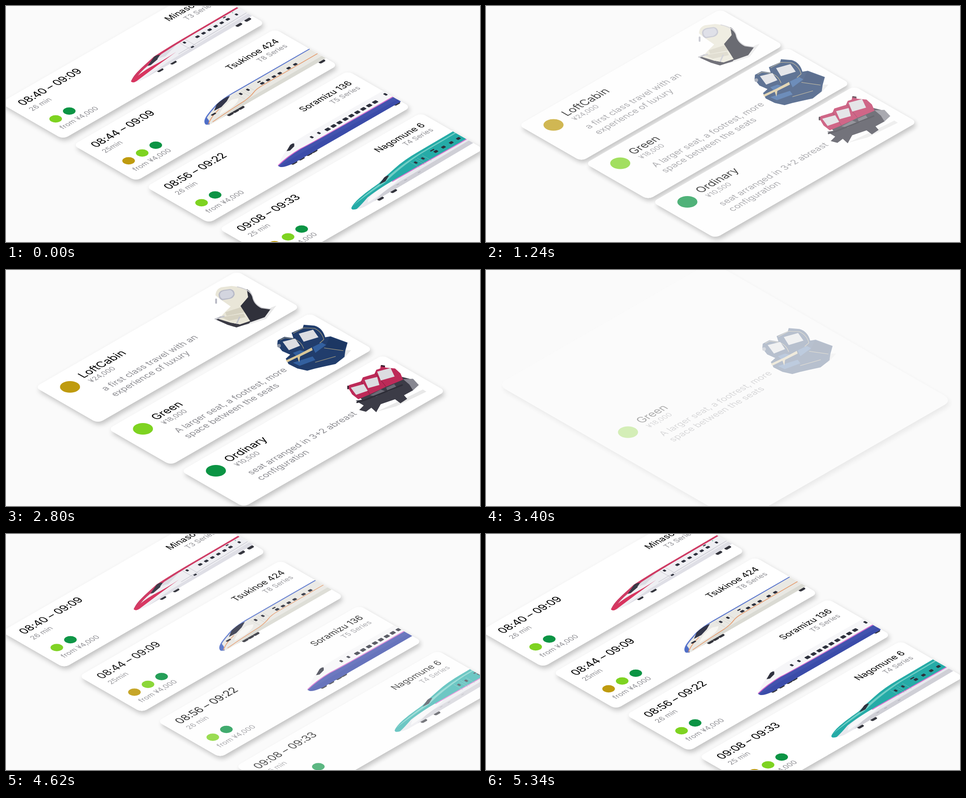
Recreate the animation shown at these times as an HTML page. Size 1058 px wide and 529 px high, loop 5.58 s.

```html
<!DOCTYPE html>
<html lang="en">
<head>
<meta charset="utf-8">
<title>Train and seat cards</title>
<style>
  html, body { margin: 0; width: 100%; height: 100%; overflow: hidden; background: #fafafa; }
  #stage { position: absolute; left: 0; top: 0; width: 1058px; height: 529px; overflow: hidden; }
  #plane {
    position: absolute; left: 0; top: 0; width: 0; height: 0;
    transform-origin: 0 0; transform: matrix(.866025, -.5, .866025, .5, 0, 0);
  }
  .card { position: absolute; box-shadow: -4px 8px 12px rgba(0, 0, 0, .23); }
  .face { position: absolute; inset: 0; overflow: hidden; background: #fff; border-radius: inherit; }
  svg { position: absolute; left: 50%; top: 50%; margin: -81px 0 0 -260px; }
  text {
    font-family: Inter, Roboto, sans-serif; font-size: 16px; fill: #8e8e93;
    font-optical-sizing: none;
  }
  .time { font-size: 24px; letter-spacing: -.5px; fill: #000; }
  .title { font-size: 24.5px; fill: #000; }
  .name { font-size: 20px; fill: #000; }
  .note { font-size: 20px; }
  .end { text-anchor: end; }
</style>
</head>
<body>
<div id="stage"><div id="plane"></div></div>
<script>
const LOOP = 5580, W = 520, H = 162, LEFT = -225.5, STEP = 188;
const TRAIN_TOP = 210, SEAT_TOP = 300;
const PANEL = { x: -242, y: 272, w: 551, h: 621, r: 20 };
const GOLD = '#bf9b0f', LIME = '#7ed321', GREEN = '#0b9444', DARK = '#2d303c';

const path = (d, fill, extra = '') => `<path d="${d}" fill="${fill}" ${extra}/>`;
const line = (d, color, width) =>
  path(d, 'none', `stroke="${color}" stroke-width="${width}" stroke-linejoin="round" stroke-linecap="round"`);
const dot = (x, y, r, fill) => `<circle cx="${x}" cy="${y}" r="${r}" fill="${fill}"/>`;
const text = (x, y, cls, s) => `<text x="${x}" y="${y}" class="${cls}">${s}</text>`;
const box = (x, y, w, h, fill = DARK) =>
  `<rect x="${x - w / 2}" y="${y - h / 2}" width="${w}" height="${h}" rx="1.4" fill="${fill}"/>`;
const boxes = (xs, y, w, h, fill) => xs.map(x => box(x, y, w, h, fill)).join('');
const wheels = (xs, y) => xs.map(x =>
  `<rect x="${x - 7}" y="${y - 4}" width="14" height="8" rx="3.5" fill="#34353d"/>`).join('');
const row = (start, step, n) => Array.from({ length: n }, (_, i) => start + step * i);

// Side views, in card coordinates
const redTrain =
  wheels([280, 314, 483, 506], 132) +
  path('M218,119 C232,111 246,107 262,103 L302,94 Q350,91 400,91 L522,90 V129 L300,131 H238 Q214,129 218,119Z', '#efeff3') +
  path('M310,124 L522,119 V129 L300,131 H240Z', '#dfdfe6') +
  path('M217,120 C232,111 246,107 262,103 L302,94 Q350,91 400,91 L522,90 V94 L400,95 Q340,96 306,100 L262,109 Q236,115 220,126Z', '#cf3a63') +
  path('M217,120 Q250,113 275,113 Q310,115 342,112 Q286,118 230,126 Q214,129 217,120Z', '#d8355f') +
  path('M273,107 L301,95 Q310,93 314,98 L300,105 L279,109Z', '#3a3a47') +
  path('M302,103 L318,98 L360,96 L318,108Z', '#dcdce3') +
  line('M340,120 L522,115', '#c3c3cc', 1.3) +
  line('M366,97 V124 M381,97 V123', '#c3c3cc', .8) +
  boxes(row(403, 15.6, 6), 105.6, 8, 6) + box(373, 102, 5, 6) + box(373.5, 122, 7, 4) +
  box(481, 97, 7, 2.6) + box(503, 106, 5, 6) + box(502, 97, 2, 2, '#2aa37a');

const creamTrain =
  wheels([272, 286, 300, 508], 133) +
  path('M217,124 C222,113 240,106 262,99 Q285,90 320,89 L522,89 V131 H240 Q214,132 217,124Z', '#e9e8e3') +
  path('M250,131 Q310,121 345,122 L522,121 V131Z', '#dadad3') +
  line('M218,124 C222,113 240,106 262,99 Q285,90 320,89.5 L522,89.5', '#5a76cd', 2.4) +
  path('M217,126 Q219,116 234,110 L230,120 L222,130Z', '#4f6fc8') +
  path('M258,105 L276,94 Q300,88 312,92 L296,100 L276,106Z', '#33364a') +
  path('M256,121 Q278,105 306,103 L318,108 Q310,118 282,121Z', '#f8f7f3') +
  line('M222,127 Q240,115 268,108 M232,128 Q280,124 320,122 Q338,120 350,115 T382,110.5 L522,110', '#e59a6c', 1.6) +
  box(250, 112, 11, 4) +
  line('M324,96 V119 M337,96 V118 M343,96 V116 M356,96 V113', '#cfcec8', .7) +
  boxes([330.5, 349], 101.5, 5, 7) + boxes([382, 397, 412, 427, 450, 467], 105.5, 8, 6) +
  box(381, 98, 8, 3);

const blueTrain =
  wheels([245, 264, 284, 297, 510], 136) +
  path('M218,123 C232,113 246,106 262,99 Q285,89 325,89 L522,90 V118 L300,114Z', '#f6f6f8') +
  path('M217,123 Q250,115 285,114 Q320,117 522,117 V137 H245 Q216,135 217,123Z', '#4253ae') +
  path('M217,126 Q250,124 285,124 L522,128 V137 H245 Q218,135 217,126Z', '#3b4ca9') +
  line('M219,122 Q250,114 285,113.5 Q320,116 522,116', '#d45fcb', 2) +
  path('M261,101 L279,92 Q288,90 288,94 L282,100 L267,104Z', '#30323f') +
  boxes([325, 343.5], 102, 5, 7) + boxes(row(363, 15.3, 9), 105, 10, 8) + box(516, 101, 5, 8);

const tealTrain =
  wheels([276, 310], 140) +
  path('M218,123 C240,112 270,108 306,104 L522,110 V135 L320,138 H236 Q214,134 218,123Z', '#e9e9ee') +
  path('M300,128 L522,124 V135 L320,138 H262Z', '#cfcfd6') +
  path('M217,124 C238,111 272,108 308,104 Q335,96 362,91 Q392,84 430,84 L522,83 V117 L350,116 Q300,115 262,121 Q236,130 222,133 Q212,130 217,124Z', '#25aba7') +
  path('M222,121 Q268,110 312,106 Q370,91 430,89 L522,88 V91 L430,92 Q370,96 318,110 Q268,114 222,121Z', '#71cfc6') +
  path('M262,124 Q305,113 350,118 Q320,130 250,133Z', '#f7f7f9') +
  line('M330,117 Q350,116.5 522,118', '#d965cb', 2) +
  path('M306,107 L327,98 Q336,96 338,100 L321,108Z', '#2f3340') +
  line('M396,97 V120 M409,97 V120 M414,97 V120 M427,97 V120', '#7fb9b8', .7) +
  boxes([402, 420.5], 105, 5, 7) + boxes([453, 472.5, 492.5, 511], 106, 8, 6.5) +
  box(451, 98.5, 10, 3) + boxes([330, 350, 385], 131, 7, 2, '#b4b4be');

// Seats, in stage coordinates
const shadow = d => path(d, '#000', 'opacity=".09"');
const creamSeat =
  shadow('M530,126 L592,84 L603,80 L580,110Z') +
  path('M465,110 L482,103 L500,118 L522,122 L550,112 L542,120 L514,129 L494,123Z', '#3b3b45') +
  path('M467,57 Q468,43 480,39 L503,36 Q522,38 538,44 L544,60 L536,88 L546,114 L522,122 L500,118 L474,110 L488,95 L501,82 L481,68Z', '#e9e6d8') +
  path('M489,95 L526,83 L534,95 L492,103Z M480,106 L530,98 L534,106 L498,114Z', '#d6d2c1') +
  path('M537,43 Q549,50 551,64 Q555,78 572,85 L590,88 L577,106 L546,117 L536,101 L523,81 L540,61Z', '#30313b') +
  line('M516,38 Q545,44 550,60 Q553,77 570,85 L591,88', '#cfcfd3', 2) +
  line('M468,110 L486,104 M515,119 L521,106', '#c5c6cd', 3) +
  line('M468.5,66 V74', '#b7b8c3', 4) +
  path('M474,55 Q475,47 485,45 L500,43 Q510,45 510,55 Q508,63 499,65 L482,68 Q474,65 474,55Z', '#b9bbc8') +
  path('M477,55 Q478,49 486,47 L500,45 Q507,48 507,55 Q504,61 498,63 L483,65 Q477,62 477,55Z', '#d3d5df');

const blueSeat =
  shadow('M690,222 L757,180 L770,180 L752,200Z') +
  path('M605,168 L606,158 L621,150 L641,153 L637,141 L662,130 L664,123 L688,125 Q706,130 712,151 L724,149 L762,163 L757,181 L755,195 L735,211 L712,216 L690,221 L672,226 L650,221 L630,211 L624,199 L634,190 L616,182Z', '#213d6c') +
  path('M640,186 L656,180 L668,183 L650,195Z M684,173 L704,163 L714,168 L690,186Z M640,208 L684,194 L690,202 L655,215Z', '#33609f') +
  path('M722,151 L760,164 L752,180 L712,174Z', '#1c3763') +
  line('M612,157 L622,152 L643,155 Q658,160 664,176 M641,142 L664,130 L688,131 Q704,138 709,156 L700,164 M710,175 L752,181 M690,207 L735,194', '#b9aa80', 1.1) +
  path('M624,203 L654,189 L682,174 L684,180 L656,194 L654,207 L650,196 L628,207Z', '#d9c798') +
  path('M617,161 L645,154 L656,170 L631,180Z', '#dcdde2') +
  path('M653,143 L685,134 L697,151 L664,161Z', '#dcdde2') +
  dot(609, 170, 4, '#8a93a5');

const redSeat =
  shadow('M826,318 L894,286 L930,268 L938,273 L870,306Z') +
  path('M780,293 L794,291 L788,284 L832,262 L884,240 L908,246 L918,256 L908,270 L888,281 L895,289 L880,299 L868,290 L836,301 L826,319 L815,309 L803,318 L788,314 L798,304Z', '#3c3c47') +
  path('M886,245 L908,244 L921,258 L908,270 L900,257Z', '#878791') +
  path('M762,262 L766,258 L792,250 L796,241 L822,233 L826,224 L835,221 L836,214 L845,215 L846,219 L868,221 L880,232 L886,246 L848,262 L812,279 L786,290 L772,279Z', '#bd2a58') +
  path('M812,281 L836,268 L846,272 L826,284Z M848,264 L866,256 L872,264 L852,273Z', '#6a6a75') +
  line('M792,250 L812,279 M824,232 L848,262', '#8f1d43', 1.2) +
  path('M769,264 L798,256 L807,271 L781,280Z M800,247 L828,240 L833,258 L808,265Z M828,228 L858,220 L867,239 L836,248Z', '#dcdce0') +
  line('M783,297 L800,292 L884,258', '#2d2d37', 3) +
  line('M838,215 L844,216 M763,261 V266', '#3a2030', 3.5);

const trains = [
  ['08:40 – 09:09', '26 min', 'Minasoe 5', 'T3 Series', [LIME, GREEN], redTrain],
  ['08:44 – 09:09', '25min', 'Tsukinoe 424', 'T8 Series', [GOLD, LIME, GREEN], creamTrain],
  ['08:56 – 09:22', '26 min', 'Soramizu 136', 'T5 Series', [LIME, GREEN], blueTrain],
  ['09:08 – 09:33', '25 min', 'Nagomune 6', 'T4 Series', [GOLD, LIME, GREEN], tealTrain]
];
const seats = [
  ['LoftCabin', '¥24,000', 'a first class travel with an', 'experience of luxury', GOLD, creamSeat],
  ['Green', '¥18,000', 'A larger seat, a footrest, more', 'space between the seats', LIME, blueSeat],
  ['Ordinary', '¥10,500', 'seat arranged in 3+2 abreast', 'configuration', GREEN, redSeat]
];

const trainView = ([time, span, name, series, marks, art]) =>
  `<g class="art">${art}</g>` +
  text(23, 36, 'time', time) + text(23, 60, '', span) + text(22, 140, '', 'from ¥4,000') +
  marks.map((c, i) => dot(36 + 35 * i, 107, 11.5, c)).join('') +
  text(498, 35, 'name end', name) + text(498, 56, 'end', series);

const seatView = ([title, price, a, b, mark, art], i) =>
  `<g transform="matrix(.57735 .57735 -1 1 ${-LEFT} ${-(SEAT_TOP + STEP * i)})">${art}</g>` +
  dot(45.5, 44.5, 18.3, mark) + text(82, 43, 'title', title) + text(83, 63.5, '', price) +
  text(82, 100, 'note', a) + text(82, 125, 'note', b);

const plane = document.getElementById('plane');
function addCard(content) {
  const el = document.createElement('div');
  el.className = 'card';
  el.innerHTML = `<div class="face"><svg width="${W}" height="${H}">${content}</svg></div>`;
  plane.append(el);
  return { el, view: el.querySelector('svg'), art: el.querySelector('.art') };
}
const trainCards = trains.map(d => addCard(trainView(d)));
const seatCards = seats.map((d, i) => addCard(seatView(d, i)));

const clamp = x => Math.max(0, Math.min(1, x));
const prog = (t, start, dur) => clamp((t - start) / dur);
const mix = (a, b, k) => a + (b - a) * k;
const grow = (t, start) => 2 ** (18 * (prog(t, start, 500) - 1));

// alpha fades the whole card, ink only what is printed on it, k opens it into the panel
function place({ el, view }, y, alpha, ink, k) {
  const s = el.style;
  s.display = alpha > .002 ? 'block' : 'none';
  s.opacity = alpha;
  s.left = mix(LEFT, PANEL.x, k) + 'px';
  s.top = mix(y, PANEL.y, k) + 'px';
  s.width = mix(W, PANEL.w, k) + 'px';
  s.height = mix(H, PANEL.h, k) + 'px';
  s.borderRadius = mix(12, PANEL.r, k) + 'px';
  s.zIndex = k > .0001 ? 1 : 0;
  view.style.opacity = ink;
}

function drawTrains(t) {
  const leaving = t < 4340;
  trainCards.forEach((card, i) => {
    const chosen = leaving && i === 1;
    const rest = leaving ? 0 : (1 - prog(t, 4340, 435 + 190 * i)) ** 4;
    const out = leaving ? 1 - (chosen ? prog(t, 1060, 100) : prog(t, 920, 120)) : 1;
    place(card, TRAIN_TOP + STEP * i + 160 * rest, (1 - rest ** 3) * out,
      clamp(1 - 1.2 * rest), chosen ? grow(t, 600) : 0);
    card.art.setAttribute('transform', `translate(${255 * rest} 0)`);
  });
}

function drawSeats(t) {
  const rest = (1 - prog(t, 1120, 440)) ** 4;
  seatCards.forEach((card, i) => {
    const chosen = i === 1;
    const out = chosen ? (1 - prog(t, 3320, 380)) ** 5 : 1 - prog(t, 3120, 120);
    place(card, SEAT_TOP + STEP * i + rest * (32 - 56 * i), (1 - rest ** 3) * out,
      1 - rest, chosen ? grow(t, 2800) : 0);
  });
}

const begin = performance.now();
function frame() {
  const t = (performance.now() - begin) % LOOP;
  drawTrains(t);
  drawSeats(t);
  requestAnimationFrame(frame);
}
frame();
</script>
</body>
</html>
```
